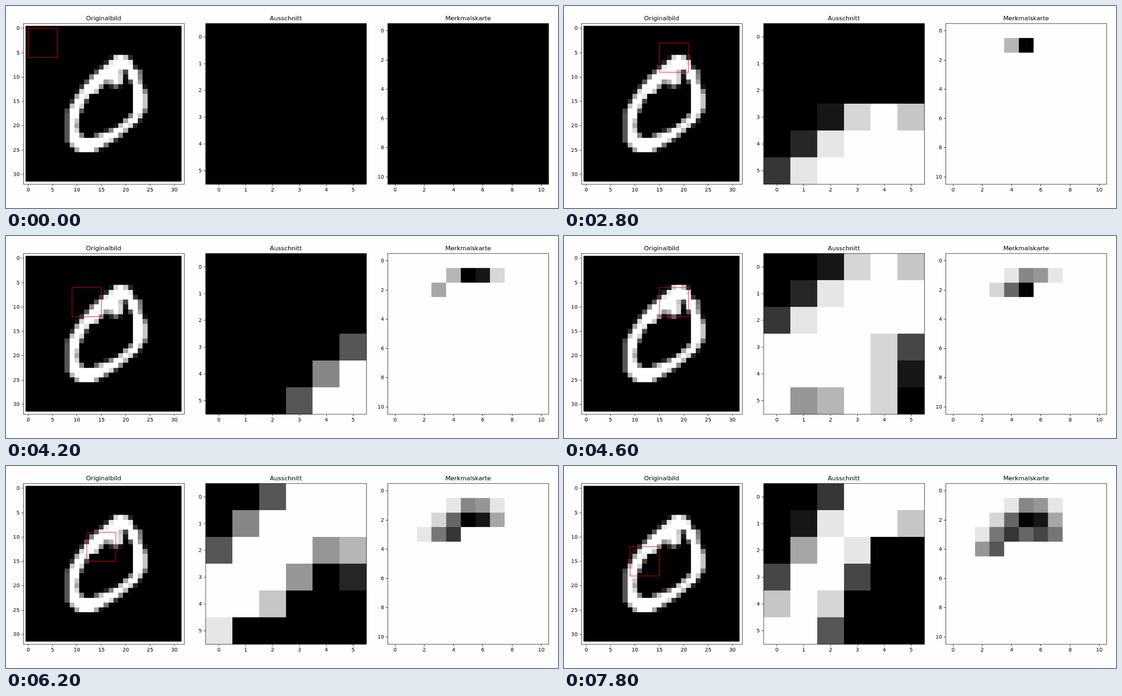
Animation of 1236x453 px, one loop 8000 ms. Source, as an HTML page with a canvas:

```html
<!DOCTYPE html>
<html lang="de">
<head>
<meta charset="utf-8">
<title>Merkmalskarte</title>
<style>
  html, body { margin: 0; overflow: hidden; background: #fefefe; }
  canvas { display: block; width: 1236px; height: 453px; }
</style>
</head>
<body>
<canvas id="stage" width="1500" height="550"></canvas>
<script>
const ctx = document.getElementById('stage').getContext('2d');
const SIZE = 32, KERNEL = 6, STRIDE = 3, PER_ROW = 9, MAP = 11;
const STEP_MS = 200, STEPS = 40, PEAK = 253;

// Layout of the three square plots, in canvas pixels.
const LEFT = 46.7, TOP = 47.24, SIDE = 437.26, SPACING = 495.2;
const plot = (title, column, low, high, every) => {
  const left = LEFT + column * SPACING, unit = SIDE / (high - low);
  return {
    title, left, every, last: Math.floor(high - 0.5),
    x: v => Math.round(left + (v - low) * unit),
    y: v => Math.round(TOP + (v - low) * unit)
  };
};
const imagePlot = plot('Originalbild', 0, -1, 32, 5);
const patchPlot = plot('Ausschnitt', 1, -0.5, KERNEL - 0.5, 1);
const mapPlot = plot('Merkmalskarte', 2, -0.5, MAP - 0.5, 2);

const grid = (size, value) =>
  Array.from({ length: size * size }, (_, i) => value(i % size, Math.floor(i / size)));

// The digit is an outline with a hole, rasterised to 32 by 32 soft pixels.
function rasterDigit() {
  const outline = new Path2D(`
    M18.6 6 H20.2 L21.7 7 22.4 9 23.4 9 23.7 11.8 24.8 14 V17 L23.2 19.5 19.6 22.6
    16.5 24.5 13.9 26 H10.9 L8.67 24 V17.4 L10.3 14.5 13.4 10.5 15.9 8.5 Z
    M22 12 V18 L19.2 20.5 17.5 21.5 15.3 22.3 13.5 23 H12 L10.9 21.8 10.6 20.5 11 18.3
    12.25 15.5 13.3 14.1 14.8 13.8 16.1 11.7 17.3 11.3 17.6 12.2 18.6 12.6 19.9 11.7
    19.8 9.1 20.6 9 20.9 10.6 Z`);
  const small = document.createElement('canvas');
  small.width = small.height = SIZE;
  const pen = small.getContext('2d', { willReadFrequently: true });
  pen.fill(outline, 'evenodd');
  const { data } = pen.getImageData(0, 0, SIZE, SIZE);
  return grid(SIZE, (c, r) => data[(r * SIZE + c) * 4 + 3] / 255 * PEAK);
}

const digit = rasterDigit();
const windowAt = step => ({ x: step % PER_ROW * STRIDE, y: Math.floor(step / PER_ROW) * STRIDE });

function patchAt(step) {
  const { x, y } = windowAt(step);
  return grid(KERNEL, (c, r) => digit[(y + r) * SIZE + x + c]);
}

const features = Array.from({ length: STEPS }, (_, step) => -patchAt(step).reduce((a, b) => a + b));

function mapAt(step) {
  return grid(MAP, (c, r) => {
    const index = r * PER_ROW + c;
    return c < PER_ROW && index <= step ? features[index] : 0;
  });
}

function normalize(values) {
  const low = Math.min(...values), range = Math.max(...values) - low;
  return values.map(v => range ? (v - low) / range * 255 : 0);
}

// Sixteen grey levels.
function grey(value) {
  const level = Math.floor((value - 6) / 16 + 0.46);
  const g = level < 1 ? 0 : level > 14 ? 254 : level * 16 + 6;
  return `rgb(${g},${g},${g})`;
}

function drawGrid({ x, y }, values, size) {
  values.forEach((v, i) => {
    const c = i % size - 0.5, r = Math.floor(i / size) - 0.5;
    ctx.fillStyle = grey(v);
    ctx.fillRect(x(c), y(r), x(c + 1) - x(c), y(r + 1) - y(r));
  });
}

function text(string, x, y, size, align) {
  ctx.font = `${size}px "DejaVu Sans", sans-serif`;
  ctx.textAlign = align;
  ctx.fillText(string, x, y);
}

function box(x0, y0, x1, y1, color, width) {
  ctx.strokeStyle = color;
  ctx.lineWidth = width;
  ctx.strokeRect(x0 + 0.5, y0 + 0.5, x1 - x0, y1 - y0);
}

function drawAxes({ title, left, every, last, x, y }) {
  const x0 = Math.round(left), y0 = Math.round(TOP), bottom = Math.round(TOP + SIDE);
  ctx.fillStyle = '#000';
  box(x0, y0, Math.round(left + SIDE), bottom, '#000', 1.11);
  text(title, left + SIDE / 2, 39, 16.67, 'center');
  for (let n = 0; n <= last; n += every) {
    ctx.fillRect(x(n), bottom, 1, 5.4);
    ctx.fillRect(x0 - 4.9, y(n), 5, 1);
    text(n, x(n) + 0.5, 505, 13.89, 'center');
    text(n, left - 9.7, y(n) + 5, 13.89, 'right');
  }
}

function draw(step) {
  ctx.fillStyle = '#fefefe';
  ctx.fillRect(0, 0, 1500, 550);

  drawGrid(imagePlot, digit, SIZE);
  drawGrid(patchPlot, normalize(patchAt(step)), KERNEL);
  drawGrid(mapPlot, normalize(mapAt(step)), MAP);

  const { x, y } = windowAt(step);
  box(imagePlot.x(x), imagePlot.y(y), imagePlot.x(x + KERNEL), imagePlot.y(y + KERNEL), '#f00', 1.39);
  [imagePlot, patchPlot, mapPlot].forEach(drawAxes);
}

function frame() {
  draw(Math.floor(performance.now() / STEP_MS) % STEPS);
  requestAnimationFrame(frame);
}
frame();
</script>
</body>
</html>
```
